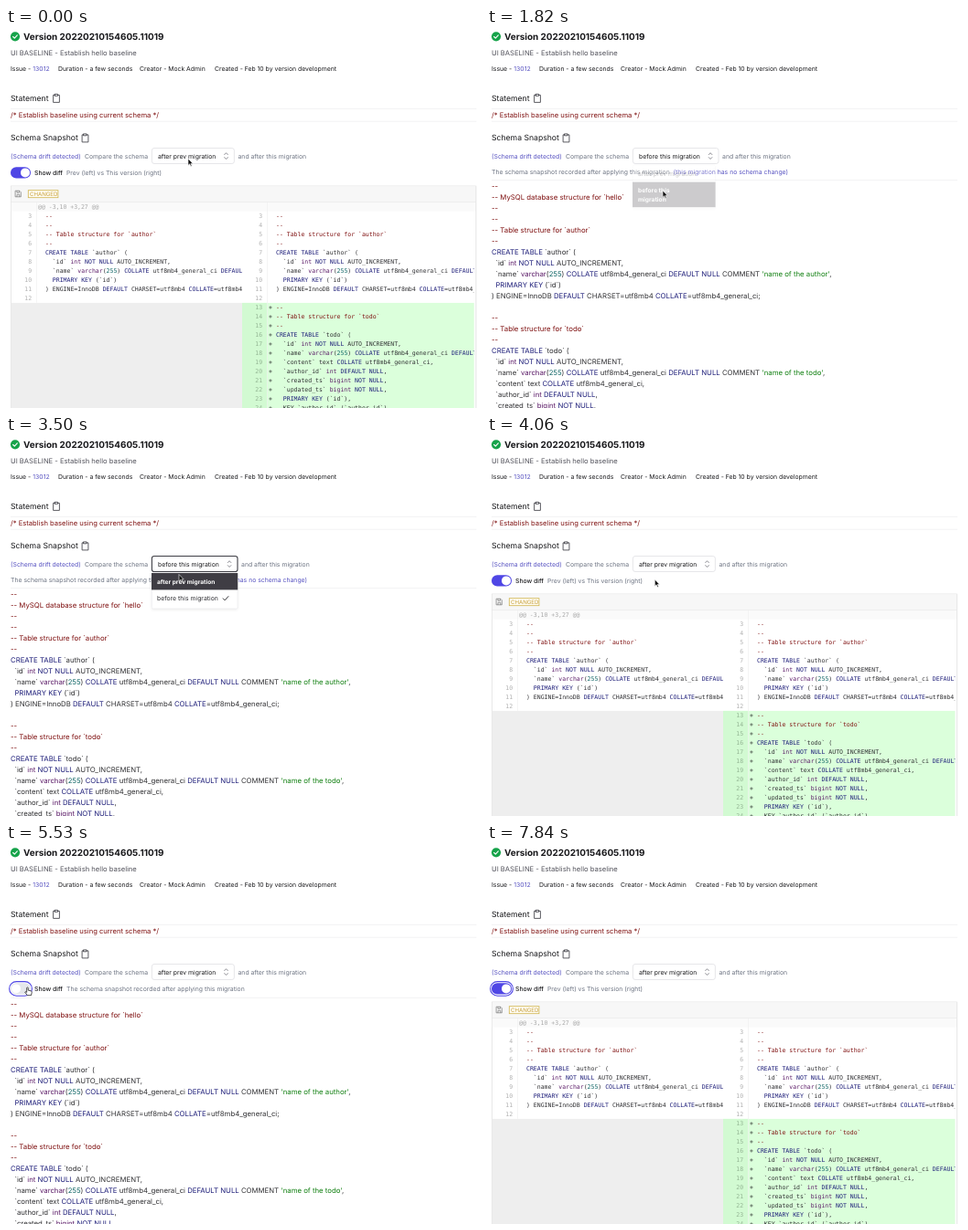
Animation of 519x416 px, one loop 7.91 s. Source, as an HTML page:

```html
<!DOCTYPE html>
<html lang="en">
<head>
<meta charset="utf-8">
<title>Schema snapshot</title>
<style>
  html, body { margin: 0; width: 100%; height: 100%; overflow: hidden; background: #fff; }
  svg { display: block; width: 519px; height: 416px; }
  text { font-family: Inter, "Liberation Sans", sans-serif; white-space: pre; text-rendering: geometricPrecision; }
  .mono { font-family: "DejaVu Sans Mono", "Liberation Mono", monospace; }
</style>
</head>
<body>
<svg id="stage" viewBox="0 0 519 416" xmlns="http://www.w3.org/2000/svg"></svg>
<script>
const LOOP = 7910, STEP = 70;
const SMALL = 6.85, BASE = 7.62, SOURCE = 7.79, LARGE = 8.65, TITLE = 9.92, CODE = 6.5;
const INK = '#18181b', GRAY = '#6b7280', INDIGO = '#4f46e5', LINK = '#5550c0', RULE = '#eeeef0';
const stage = document.getElementById('stage');

function el(parent, tag, attrs = {}) {
  const node = document.createElementNS('http://www.w3.org/2000/svg', tag);
  for (const k in attrs) node.setAttribute(k, attrs[k]);
  parent.append(node);
  return node;
}
const group = (parent, attrs) => el(parent, 'g', attrs);
const rect = (parent, x, y, width, height, fill, more) =>
  el(parent, 'rect', { x, y, width, height, fill, ...more });
const stroke = (parent, d, color, width = 0.8) =>
  el(parent, 'path', { d, fill: 'none', stroke: color, 'stroke-width': width, 'stroke-linecap': 'round', 'stroke-linejoin': 'round' });
function text(parent, x, y, str, size, fill = INK, more) {
  const t = el(parent, 'text', { x, y, 'font-size': size, fill, ...more });
  t.textContent = str;
  return t;
}
const show = (node, on) => node.setAttribute('visibility', on ? 'inherit' : 'hidden');

// SQL colouring
const TOKEN = /(--.*)|('[^']*')|(CREATE TABLE|PRIMARY KEY|NOT NULL|\b(?:NULL|DEFAULT|COLLATE)\b)|\b(int|varchar|bigint)\b|\b(255)\b/g;
const TOKEN_FILL = ['#7f1010', '#107f10', '#1c1c78', '#5c1c68', '#106666'];
function sql(parent, x, y, line, size, more) {
  const t = text(parent, x, y, '', size, '#303033', more);
  let last = 0;
  for (const m of line.matchAll(TOKEN)) {
    t.append(line.slice(last, m.index));
    const kind = m.slice(1).findIndex(Boolean);
    el(t, 'tspan', { fill: TOKEN_FILL[kind] }).textContent = m[0];
    last = m.index + m[0].length;
  }
  t.append(line.slice(last));
}

const intro = name => ['--', '-- Table structure for `' + name + '`', '--', 'CREATE TABLE `' + name + '` (',
  '  `id` int NOT NULL AUTO_INCREMENT,',
  "  `name` varchar(255) COLLATE utf8mb4_general_ci DEFAULT NULL COMMENT 'name of the " + name + "',"];
const author = [...intro('author'), '  PRIMARY KEY (`id`)',
  ') ENGINE=InnoDB DEFAULT CHARSET=utf8mb4 COLLATE=utf8mb4_general_ci;', ''];
const todo = [...intro('todo'), '  `content` text COLLATE utf8mb4_general_ci,', '  `author_id` int DEFAULT NULL,',
  '  `created_ts` bigint NOT NULL,', '  `updated_ts` bigint NOT NULL,', '  PRIMARY KEY (`id`),', '  KEY `author_id` (`author_id`),'];

function clipboard(x, y) {
  stroke(stage, `M${x - 1.6} ${y - 3.6}h-1.8v8h6.8v-8h-1.8M${x - 1.6} ${y - 4.6}h3.2v1.9h-3.2z`, '#3f3f46', 0.85);
}

function drawHeader() {
  el(stage, 'circle', { cx: 10, cy: 9.3, r: 5.1, fill: '#16a34a' });
  stroke(stage, 'M7.7 9.5l1.6 1.6 3-3.3', '#fff', 1.1);
  text(stage, 19, 12.8, 'Version 20220210154605.11019', TITLE, INK, { 'font-weight': 700 });
  text(stage, 5, 30.3, 'UI BASELINE - Establish hello baseline', BASE, '#52525b');
  text(stage, 5, 46.9, 'Issue - ', SMALL);
  text(stage, 29.3, 46.9, '13012', SMALL, LINK);
  text(stage, 57, 46.9, 'Duration - a few seconds', SMALL);
  text(stage, 146, 46.9, 'Creator - Mock Admin', SMALL);
  text(stage, 228, 46.9, 'Created - Feb 10 by version development', SMALL);
  text(stage, 5, 80, 'Statement', LARGE);
  clipboard(55, 77);
  rect(stage, 5, 88, 509, 0.7, RULE);
  rect(stage, 5, 101.8, 509, 0.7, RULE);
  text(stage, 5, 98.2, '/* Establish baseline using current schema */', BASE, TOKEN_FILL[0]);
  text(stage, 5, 123.4, 'Schema Snapshot', LARGE);
  clipboard(86.5, 120.5);
  text(stage, 5, 142.5, '(Schema drift detected)', SMALL, LINK);
  text(stage, 86, 142.5, 'Compare the schema', SMALL, GRAY);
}

function drawSelect(label, width) {
  const g = group(stage);
  const box = rect(g, 159.4, 131.5, width, 17, '#fff', { rx: 2.6 });
  text(g, 166, 142.5, label, SMALL);
  const cx = 150.5 + width;
  stroke(g, `M${cx - 1.8} 138.6l1.8-1.9 1.8 1.9M${cx - 1.8} 141.6l1.8 1.9 1.8-1.9`, '#71717a', 0.8);
  text(g, 163.5 + width, 142.5, 'and after this migration', SMALL, GRAY);
  return { g, box };
}

function drawToggle() {
  const g = group(stage);
  const ring = rect(g, 3.6, 150.6, 24.8, 15.6, '#fff', { rx: 7.8, stroke: INDIGO, 'stroke-width': 1.1 });
  const track = rect(g, 5, 152.2, 22, 12.4, INDIGO, { rx: 6.2 });
  const thumb = el(g, 'circle', { cx: 21, cy: 158.4, r: 5, fill: '#fff' });
  text(g, 31, 161, 'Show diff', SMALL, INK, { 'font-weight': 500 });
  const on = text(g, 66, 161, 'Prev (left) vs This version (right)', SMALL, GRAY);
  const off = text(g, 66, 161, 'The schema snapshot recorded after applying this migration', SMALL, GRAY);
  return { g, ring, track, thumb, on, off };
}

function drawDiff() {
  const g = group(stage);
  const rowTop = n => 200.6 + (n - 3) * 10.03;
  rect(g, 5.4, 173, 508, 250, '#fff', { stroke: '#e2e2e2', 'stroke-width': 0.8 });
  rect(g, 5.8, 173.4, 507.2, 17, '#f7f7f7');
  rect(g, 5.8, 190.2, 507.2, 0.6, '#e2e2e2');
  stroke(g, 'M10.5 178.2h4.2l1.6 1.6v5h-5.8zM12 178.4v2h2.4v-2M12 184.6v-2.2h2.8v2.2', '#777', 0.7);
  rect(g, 24.3, 177.7, 32.6, 8, '#fffdf5', { stroke: '#d0b44c', 'stroke-width': 0.8 });
  text(g, 26, 184, 'CHANGED', 6.1, '#c8a03c');
  rect(g, 5.8, 190.8, 507.2, 9.8, '#fafafa');
  text(g, 35, 198, '@@ -3,10 +3,27 @@', CODE, '#a8a8a8', { class: 'mono' });
  rect(g, 5.8, rowTop(13), 252.2, 120, '#eeeeee');
  rect(g, 258, rowTop(13), 253.5, 120, '#dbffdb');
  rect(g, 258, rowTop(13), 27, 120, '#d2fad2');
  for (const x of [33, 285]) rect(g, x, 190.8, 0.6, x < 200 ? rowTop(13) - 190.8 : 230, '#eeeeee');
  const sides = [[5, author], [257, [...author, ...todo]]];
  sides.forEach(([x, lines], side) => {
    const id = 'side' + side;
    rect(el(g, 'clipPath', { id }), x, 190, side ? 254.5 : 253, 226, '#000');
    const body = group(g, { 'clip-path': `url(#${id})` });
    ['--', ...lines].forEach((line, i) => {
      const n = i + 3, y = rowTop(n) + 7.2;
      text(body, x + 23.2, y, n, CODE, n > 12 ? '#93b593' : '#b0b0b0', { class: 'mono', 'text-anchor': 'end' });
      if (n > 12) text(body, x + 30, y, '+', CODE, INK, { class: 'mono' });
      sql(body, x + 38, y, line, CODE, { class: 'mono' });
    });
  });
  return g;
}

function drawSnapshot() {
  const g = group(stage);
  rect(g, 5, 166, 509, 0.7, RULE);
  ['--', '-- MySQL database structure for `hello`', '--', ...author, ...todo]
    .forEach((line, i) => sql(g, 5, 175.7 + i * 12, line, SOURCE));
  return g;
}

function drawMenu(width, wrapped, chosen) {
  const g = group(stage);
  const tall = wrapped ? 27.6 : 19;
  rect(g, 159.4, 150, width, 19 + tall + 1, '#fff', { rx: 1.5, stroke: '#ececef', 'stroke-width': 0.7,
    style: 'filter:drop-shadow(0 1.5px 1.5px rgba(0,0,0,.08))' });
  const rows = [
    { top: 150, height: 18.4, lines: ['after prev migration'] },
    { top: 168.6, height: tall, lines: wrapped ? ['before this', 'migration'] : ['before this migration'] }
  ];
  const marks = rows.map((row, i) => {
    const bar = rect(g, 159, row.top, width + 0.6, row.height, '#3f3d44');
    const labels = row.lines.map((s, k) => text(g, 165, row.top + 11.8 + k * 10, s, SMALL));
    const check = i === chosen
      ? stroke(g, `M${width + 143.6} ${row.top + 9.3}l1.9 1.9 3.8-4.2`, INK, 0.9) : null;
    return { bar, labels, check };
  });
  const hover = active => marks.forEach((m, i) => {
    const on = i === active;
    m.bar.setAttribute('opacity', on ? 1 : 0);
    for (const t of m.labels) {
      t.setAttribute('fill', on ? '#fff' : '#2c2c30');
      t.setAttribute('font-weight', on ? 700 : 400);
      t.setAttribute('font-size', on ? 6.6 : SMALL);
    }
    if (m.check) m.check.setAttribute('stroke', on ? '#fff' : INK);
  });
  return { g, hover, chosen, check: marks[chosen].check };
}

drawHeader();
const diff = drawDiff();
const snapshot = drawSnapshot();
const toggle = drawToggle();
const note = group(stage);
text(note, 5, 160, 'The schema snapshot recorded after applying this migration', SMALL, GRAY);
text(note, 203.5, 160, '(this migration has no schema change)', SMALL, LINK);
const selects = [drawSelect('after prev migration', 90), drawSelect('before this migration', 93.6)];
const menus = [
  { ...drawMenu(90, true, 0), open: 700, close: 1750 },
  { ...drawMenu(93.6, false, 1), open: 3220, close: 3850 }
];

const arrow = el(stage, 'path', { d: 'M0 0v7.4l1.7-1.6 1.2 2.7 1.2-.5-1.2-2.6h2.3z', fill: '#111', stroke: '#fff', 'stroke-width': 0.6 });
const hand = el(stage, 'path', {
  d: 'M-.8 .4q.8-.9 1.5 0v2.7l3.2.8q1 .4.8 1.6l-.7 3.2h-4.2l-2.6-3.6q.4-1 1.4-.2l.6.5z',
  fill: '#fff', stroke: '#222', 'stroke-width': 0.8, 'stroke-linejoin': 'round' });

// time, x, y of the pointer
const PATH = [[0, 199, 143], [350, 199, 143], [630, 195, 143], [840, 195, 143], [1120, 194, 164.5], [1260, 194, 165],
  [1540, 192, 178], [2660, 192, 178], [3010, 189.5, 143], [3290, 189.5, 143], [3500, 189, 151.5], [3710, 189, 157],
  [3990, 189, 157], [4620, 23.5, 157], [5600, 23.5, 157], [6090, 23, 158], [6440, 23, 158], [6790, -12, 190], [LOOP, -12, 190]];
const CLICK_OFF = 5040, CLICK_ON = 6090, FADE = 95;
const clamp = v => Math.max(0, Math.min(1, v));
const ease = v => v * v * (3 - 2 * v);

function pointerAt(t) {
  const i = PATH.findIndex((p, k) => k && t <= p[0]);
  const [a, b] = [PATH[i - 1], PATH[i]];
  const k = ease((t - a[0]) / (b[0] - a[0]));
  return [a[1] + (b[1] - a[1]) * k, a[2] + (b[2] - a[2]) * k];
}

function render(t) {
  const [x, y] = pointerAt(t);
  const before = t >= 1750 && t < 3850;
  const off = t >= CLICK_OFF && t < CLICK_ON;

  show(diff, !before && !off);
  show(snapshot, before || off);
  snapshot.setAttribute('transform', `translate(0 ${off ? 2 : 0})`);
  show(note, before);
  show(toggle.g, !before);
  show(toggle.ring, !before && t >= CLICK_OFF);
  show(toggle.on, !before && !off);
  show(toggle.off, off);
  const slide = ease(clamp((t - CLICK_OFF) / 200)) - ease(clamp((t - CLICK_ON) / 200));
  toggle.thumb.setAttribute('cx', 21 - 10 * slide);
  toggle.track.setAttribute('fill', off ? '#e5e7eb' : INDIGO);

  selects.forEach((s, i) => {
    const focused = menus[i].open <= t && t < menus[i].close;
    show(s.g, before === (i === 1));
    s.box.setAttribute('stroke', focused ? '#3f3f46' : '#e0e0e4');
    s.box.setAttribute('stroke-width', focused ? 1.1 : 0.8);
  });
  for (const m of menus) {
    const alpha = t < m.open ? 0 : clamp(1 - (t - m.close) / FADE);
    show(m.g, alpha > 0);
    m.g.setAttribute('opacity', alpha);
    m.hover(y < 150 ? m.chosen : y < 168 ? 0 : 1);
    show(m.check, alpha > 0 && t < m.close);
  }

  const pointing = x < 28 && t > 4500;
  show(arrow, !pointing);
  show(hand, pointing);
  (pointing ? hand : arrow).setAttribute('transform', `translate(${x} ${y})`);
}

const start = performance.now();
function tick() {
  const t = (performance.now() - start) % LOOP;
  render(Math.floor(t / STEP) * STEP);
  requestAnimationFrame(tick);
}
tick();
</script>
</body>
</html>
```
